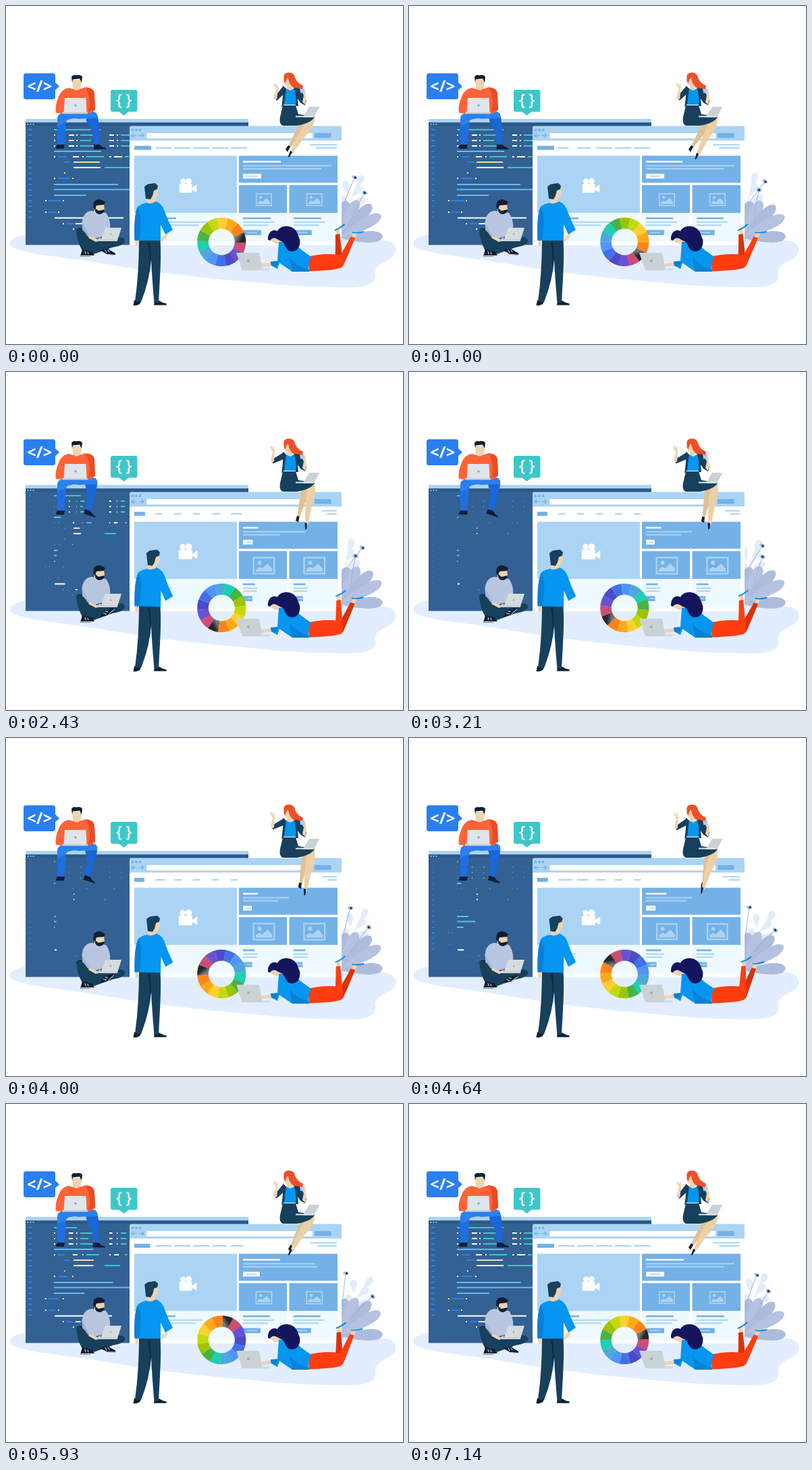
These frames come from a looping animation (588x500 px, 7210 ms). An HTML page:

```html
<!DOCTYPE html>
<html lang="en">
<head>
<meta charset="utf-8">
<title>Web team at work</title>
<style>
html, body { margin: 0; width: 100%; height: 100%; overflow: hidden; background: #fff; }
svg { display: block; width: 588px; height: 500px; }
text { font: 700 24px "Open Sans", "Noto Sans", sans-serif; fill: #fff; text-anchor: middle; }
.navy { fill: #17405c; } .ink { fill: #0e1f33; } .skin { fill: #f0d3b0; }
.blue { fill: #0496f0; } .deep { fill: #0a7fd6; } .sky { fill: #abd4f4; }
.mid { fill: #74b1e7; } .pale { fill: #eefaff; } .white { fill: #fff; }
.orange { fill: #ff6337; } .red { fill: #ff3d10; } .brick { fill: #d93208; }
.grey { fill: #cbd2d6; } .line { fill: none; stroke-linecap: round; stroke-linejoin: round; }
</style>
</head>
<body>
<svg viewBox="0 0 588 500">
<defs>
  <linearGradient id="soot" x1="0" y1="0" x2=".3" y2="1">
    <stop stop-color="#777"/><stop offset="1" stop-color="#272727"/>
  </linearGradient>
  <g id="picture">
    <rect x="-11.2" y="-8.7" width="22.4" height="17.4" fill="none" stroke="#abd4f4" stroke-width="1.7"/>
    <circle cx="-4.7" cy="-3.2" r="2.2" class="sky"/>
    <path class="sky" d="M-9 6.4V4L-5 1.2-2 3 4-2.4 9 3.2V6.4Z"/>
  </g>
</defs>

<path fill="#e2eeff" d="M30 338C10 341 4 349 6 353C10 364 62 369 118 377C165 384 200 391 244 396C290 402 325 405 370 409C420 414 460 416 505 416C540 417 550 407 547 396C546 384 558 380 570 373C581 366 580 352 566 348C540 343 520 347 500 340V320H30Z"/>

<g id="plant">
  <g id="fern" fill="#e2ecfb"></g>
  <g id="leaves"></g>
  <g id="flowerA"><path class="line" d="M498 300Q497 272 498 252" stroke="#9fb4d8"/>
    <ellipse cx="498" cy="250" rx="4" ry="2.6" fill="#aebfe2"/><circle cx="499" cy="250" r="1.7" fill="#20386b"/></g>
  <g id="flowerB"><path class="line" d="M511 317Q509 292 511 273" stroke="#9fb4d8"/>
    <ellipse cx="511" cy="271.5" rx="4.2" ry="2.8" fill="#aebfe2"/><circle cx="511" cy="271.5" r="1.8" fill="#20386b"/></g>
</g>

<path fill="#336193" d="M29 172H359V353.500H29Z"/>
<path class="sky" d="M30 167H358Q359 167 359 168V172.500H29V168Q29 167 30 167Z"/>
<path fill="#2c5887" d="M29 172.500H359V177H29Z"/>
<g class="sky"><circle cx="32.500" cy="175" r="1"/><circle cx="36.500" cy="175" r="1"/><circle cx="40.500" cy="175" r="1"/></g>
<g id="code"></g>

<path class="white" d="M183 198H497V354H183Z"/>
<path class="sky" d="M185 177.500H495Q497 177.500 497 180V199H183V180Q183 177.500 185 177.500Z"/>
<g class="mid"><circle cx="187.500" cy="183.300" r="1.9"/><circle cx="193" cy="183.300" r="1.9"/><circle cx="198.500" cy="183.300" r="1.9"/><path d="M457 188H481.500V195H457Z"/></g>
<path class="line" stroke="#74b1e7" stroke-width="1.2" d="M193 191.700H186.500M189 189L186 191.700L189 194.400M197 191.700H203.500M201 189L204 191.700L201 194.400"/>
<path class="white" d="M208.500 188H454V196H208.500Z"/>
<path class="sky" d="M190 221.500H342V306H190Z"/>
<path class="mid" d="M345 221.500H491V261.500H345ZM345 265H416V306H345ZM419.500 265H491V306H419.500Z"/>
<path class="pale" d="M190 306H342V348.500H190ZM345 306H416V348.500H345ZM419.500 306H491V348.500H419.500Z"/>
<g id="camera" class="white"><circle cx="-6.500" cy="-7" r="4"/><circle cx="2" cy="-7" r="4.600"/><rect x="-12" y="-3" width="19" height="13.500" rx="1.5"/><path d="M7 3L14-2V10L7 6Z"/></g>
<use id="pictureA" href="#picture"/><use id="pictureB" href="#picture"/>
<g id="page"></g>

<g><rect x="26" y="99.500" width="47" height="38.500" rx="3.500" fill="#2a7fef"/><path fill="#2a7fef" d="M72 112L79 119L72 125Z"/><text x="49.700" y="126.500">&lt;/&gt;</text></g>
<g><rect x="155" y="124" width="39.500" height="32.500" rx="3" fill="#3dc7c9"/><path fill="#3dc7c9" d="M167 156H182L174.500 162Z"/><text x="174.700" y="147" style="font-weight:600;font-size:23px">{ }</text></g>

<g>
  <path fill="#1f6fe0" d="M77 162L90 160L86.500 206H76.500Q74 185 77 162Z"/>
  <path class="ink" d="M76 205H87L86 211H74Q74 208 76 205Z"/>
  <g id="sitterLeg"><path fill="#1a66d6" d="M119 160Q134 154 136 164Q139 180 138 206H130.500Q130 186 119 170Z"/>
    <path class="ink" d="M130 205H138Q142 209 148 210.500V212H130Z"/></g>
  <path fill="#2b80f0" d="M76 168Q76 157 90 158L128 156Q137 157 135 166L108 167Q91 165 87 173L76 177Z"/>
  <path class="orange" d="M93 121Q105 126 118 120Q130 121 131 130L132 154L124 159H82L74 158Q72 148 78 134Q82 123 93 121Z"/>
  <path fill="#e94c24" d="M119 121Q131 121 131 131L132 153L122 157Q127 140 119 121Z"/>
  <path class="skin" d="M98 109H112V115Q111 121 109 123Q104 127 99 122Z"/>
  <path class="ink" d="M97 105Q99 101 104 102.500Q111 101 113 105L112 113L109 107.500L99 108.500L98 113Z"/>
  <path fill="#dee6ec" d="M87 136H118.500L119.500 158H85.500Z"/><path class="grey" d="M83 157H121V159.500H83Z"/><circle cx="103" cy="147" r="1.8" fill="#9aa8b5"/>
</g>

<g>
  <g id="legBack"><path fill="#dfc196" d="M438 168L450 167Q446 183 433 194L420 211L417 210Q425 191 438 168Z"/><path class="ink" d="M418 206L421 208L417 216L414 212Z"/></g>
  <g id="legFront"><path fill="#ecd0a7" d="M446 168L458 165Q456 181 441 195L424 219L420.500 218Q429 194 446 168Z"/><path class="ink" d="M421 214L424 216L420 223L417.500 224Z"/></g>
  <path class="navy" d="M410 147H429L433 160L457 164Q453 173 431 177L410 177Q403 174 407 160Z"/>
  <g id="armUpper"><path class="navy" d="M411 118L414 128L401 140L396.500 136Z"/>
    <g id="armLower"><path class="skin" d="M399 139L396.500 135L400 123L396 116L398 114L400 118L402 114L403 121L401.500 137Z"/></g></g>
  <path class="skin" d="M412 104H422L425 121L420 127L415 122L416 118Q412 117 412 112Z"/>
  <path class="blue" d="M412 121L421 125L430 120L431 146H411Z"/>
  <path class="navy" d="M410 118L415 122L412 145L408 150Q411 132 410 118ZM426 119L435 120L445 140L443 147L436 143L432 137L433 148H429Q431 135 426 119Z"/>
  <path class="skin" d="M443 146L445 137L443 123L439 124L441 132L439 142Z"/>
  <path fill="#b3c9ee" d="M435 121.500L442 122L441 128.500H436Z"/>
  <path fill="#ee4f2a" d="M411.500 108Q410 99 418 98.500Q427 98 428 106Q431 114 440 118L439 123Q431 121 426 121Q419 116 418 106Q415 107 414 114Q411 113 411.500 108Z"/>
  <path class="grey" d="M449 149H464.500L456 164.500H440Z"/><path fill="#e4e9ec" d="M429 162.500H455V164.500H429Z"/>
</g>

<g>
  <path class="ink" d="M104 331Q110 325 116 333L148 352L139 362Q111 354 104 331Z"/>
  <path fill="#b9c6df" d="M127 303Q114 304 112.500 321L114 335L128 345L153 338Q157 318 148 306Z"/>
  <path fill="#a5b5d3" d="M114 322L124 341L120 341L113 333Z"/>
  <path class="skin" d="M131 293H145L146 301L141 307L131 306Z"/>
  <path class="ink" d="M130 290Q135 284 142 287L147 290L145 294L134 295L132 301L129 298ZM132 299L137 303L146 301Q145 308 138 308Q131 307 132 299Z"/>
  <path class="navy" d="M104 332Q111 325 121 341Q130 348 148 346L167 342Q177 342 176 349Q174 354 158 357L130 367L113 362Q105 348 104 332Z"/>
  <path class="ink" d="M113 360L127 363L131 369L124 370.500H110Z"/>
  <g id="shoe"><path class="ink" d="M139 361L151 359L162 366V369L151 368Z"/><path class="line" stroke="#fff" stroke-width=".9" d="M151 367.500L162 368.500M147 361L149 365M151 361L153 364"/></g>
  <path class="line" stroke="#fff" stroke-width=".9" d="M111 369.500H130M117 363L118 367M121 364L122 367"/>
  <path class="skin" d="M123 340L136 345L140 342L140 347L133 349L122 343Z"/>
  <path fill="#d5dce0" d="M147 328H171L165 347H140Z"/><path class="grey" d="M133 345H165V348H133Z"/><circle cx="155" cy="337.500" r="1.2" fill="#98a4ae"/>
</g>

<g>
  <path class="ink" d="M190 435L200 437L198 441L193 443H188.500ZM220 436H227Q231 439 237.500 440V442.500H219Z"/>
  <path class="navy" d="M197 345H228.500Q230 370 228 402L226 439H219.500Q216 400 215 374Q213 405 200 438L191 437Q197 395 197 345Z"/>
  <path fill="#0e2d45" d="M213 347L215 374L212 392Q214 368 210 350Z"/>
  <g id="torso"><path class="skin" d="M191 345H196L196 354L192 356ZM209 283L220 281L221 292L209 294Z"/>
    <path id="forearm" class="skin" d="M241 334L237 344L230 349L229 346L233 340Z"/>
    <path class="blue" d="M208 291Q215 294 222 289Q231 292 235 304Q240 318 247 331L236 338L229 323V347H190.500Q189 310 195 297Q199 293 208 291Z"/>
    <path class="deep" d="M195 297L200 312L198 346H190.500Q189 310 195 297Z"/></g>
  <g id="head"><path class="skin" d="M216 267L225 268V280L220 286L213 284Z"/><path class="navy" d="M205 267L210 263.500L221 262L225 266L224 271L219 273L217 281L214 286L207 285Z"/></g>
</g>

<g id="wheel"></g>

<g>
  <path class="grey" d="M341 365H375L380 391H350Z"/><circle cx="359" cy="377" r="2" fill="#a2abb1"/><path fill="#c9def6" d="M378 388H392L390 391.500H379Z"/>
  <g id="legDark"><path class="skin" d="M491 342L490 329L496 327L496 342Z"/><path fill="#0a84dc" d="M488 331Q495 329 503 322L504 324Q497 330 489 332.500Z"/><path class="brick" d="M487 386Q489 360 489.500 338L496 337Q498 360 499 383Z"/></g>
  <path class="red" d="M447 371Q470 365 494 368Q502 378 497 387Q488 391 449 392.500Z"/>
  <g id="legBright"><path class="skin" d="M491 342L490 329L496 327L496 342Z"/><path class="blue" d="M488 331Q495 329 503 322L504 324Q497 330 489 332.500Z"/><path class="red" d="M487 386Q489 360 489.500 338L496 337Q498 360 499 383Z"/></g>
  <path class="skin" d="M390 340L405 337L408 350L401 352Q393 350 390 345Z"/>
  <path class="skin" d="M377 381L397 379L400 384L380 386Z"/>
  <path class="blue" d="M404 349Q423 346 438 361L452 371Q446 382 449 393H424L405 380L402 389L393 384L392 378L402 377Z"/>
  <path class="deep" d="M420 372Q431 386 449 390V393H424ZM392 378H403L401 385L393 384Z"/>
  <path fill="#15155d" d="M388 346C387 334 396 329 402 333C406 324 422 323 429 332C433 338 433 341 435 345C437 354 432 363 424 363C413 363 414 350 408 348C402 346 397 339 391 347Z"/>
</g>
</svg>
<script>
const LOOP = 7210, FRAMES = 101;
const $ = id => document.getElementById(id);
const add = (parent, tag, attrs) => {
  const node = document.createElementNS("http://www.w3.org/2000/svg", tag);
  for (const key in attrs) node.setAttribute(key, attrs[key]);
  return $(parent).appendChild(node);
};
const ease = x => { x = Math.min(1, Math.max(0, x)); return x * x * (3 - 2 * x); };
// 1 is open, 0 is folded; the pause sits between the two eases.
const wave = (t, delay) => {
  const s = (t - delay + 2 * LOOP) % LOOP;
  return 1 - ease(s / 1700) + ease((s - 3200) / 2200);
};

const bars = [];
function bar(parent, x, y, w, h, fill, delay, min, anchor = 0) {
  const node = add(parent, "rect", { x, y: y - h / 2, width: w, height: h, fill });
  bars.push({ node, x, w, delay, min, anchor });
}

// Code window: each run is "x width colour"; runs further right fold later.
const inks = { t: "#3cc5cd", b: "#2d80ec", w: "#fff", l: "#66b9f3", c: "#eddcb0" };
const props = "71 2 w,76 12 b,93 8 w,104 2 w,153 7 w,164 2 w,170 14 t,110 ";
const rows = [
  [183, "71 69 t", 1650],
  [191, props + "28 t", 1050], [199, props + "16 t", 1050], [207, props + "28 t", 1050],
  [215, "71 70 l", 1100],
  [223, "71 2 w,77 12 b,99 9 w,113 2 w,119 26 t,153 3 w,160 12 w,176 6 t", 1100],
  [231, "86 10 b,100 39 c", 1100], [239, "100 40 w,146 38 t", 1150],
  [247, "86 2 c", 1150], [255, "71 2 w,77 17 b,98 2 w", 1100],
  [264, "71 95 l", 900], [271.500, "71 119 l", 800], [280, "71 48 l", 850],
  [288, "58 2 w,63 18 b,84 2 w", 1100], [305, "58 2 w,63 12 b,77 2 w", 1100],
  [313.500, "72 102 w", 1100], [322, "84 2 w,90 11 b,103 10 w", 1100], [330, "99 2 w", 1000]
];
for (const [y, runs, delay] of rows)
  for (const run of runs.split(",")) {
    const [x, w, ink] = run.split(" ");
    bar("code", +x, y, +w, 2, inks[ink], delay + (x - 71) * 4.5, 0.03);
  }
for (let i = 0; i < 17; i++)
  bar("code", 33, 182.800 + i * 8.100, 5.500, 2.200, inks.b, 1300 - i * 82, 0.15, 0.5);

// Page contents
const MID = "#74b1e7", SKY = "#abd4f4", WHITE = "#fff";
bar("page", 190, 209.800, 25, 6, MID, 1050, 0.6);
for (let i = 0; i < 5; i++) bar("page", 221 + 28 * i, 209.800, 24.500, 2.200, SKY, i * 380, 0.42);
bar("page", 450, 205.300, 40, 2, SKY, 850, 0.55, 1);
bar("page", 459, 210, 31, 2, SKY, 900, 0.45, 1);
bar("page", 351, 230.300, 56, 2.600, WHITE, 750, 0.4);
bar("page", 351, 236.300, 131, 2, SKY, 1450, 0.52);
bar("page", 351, 240.800, 116, 2, SKY, 950, 0.45);
bar("page", 351, 251.700, 27, 7, WHITE, 1050, 0.48);
bar("page", 356, 251.700, 16, 1.600, SKY, 1050, 0.45);
bar("page", 195, 314, 57, 2.600, MID, 800, 0.5);
bar("page", 195, 319.700, 103, 2, SKY, 1000, 0.45);
bar("page", 195, 324.300, 90, 2, SKY, 900, 0.45);
for (const x of [351, 425.800]) {
  bar("page", x, 314, 41, 2.600, MID, 800, 0.43);
  bar("page", x, 319.700, 47, 2, SKY, 800, 0.46);
  bar("page", x, 324.300, 38, 2, SKY, 800, 0.55);
  bar("page", x, 335.200, 27, 7.500, MID, 900, 0.5);
  bar("page", x + 6, 335.200, 15, 1.600, SKY, 900, 0.45);
}

// Colour wheel, clockwise from the dark slice
const slices = ["url(#soot)", "#cb4d77", "#6b51d1", "#4b4bc9", "#4470e6", "#4f96fa", "#4da9d8",
  "#1cd0b4", "#48b344", "#9bc503", "#c4d90c", "#ffd030", "#ffa91a", "#ff8318"];
const step = 2 * Math.PI / slices.length;
slices.forEach((stroke, i) => {
  const at = k => { const a = -0.18 + step * (i + k); return `${27.800 * Math.cos(a)} ${27.800 * Math.sin(a)}`; };
  add("wheel", "path", { d: `M${at(-0.5)}A27.800 27.800 0 0 1 ${at(0.51)}`, fill: "none", stroke, "stroke-width": 16.500 });
});

// Plant: leaves fan out from the root.
const leaf = (parent, len, width, fill) => add(parent, "path", {
  d: `M0 0C${-width * 0.5} ${-len * 0.3} ${-width * 1.3} ${-len * 0.95} 0 ${-len}C${width * 1.3} ${-len * 0.95} ${width * 0.5} ${-len * 0.3} 0 0Z`, fill });
const fan = [[10, 56], [25, 62], [43, 69], [60, 71], [88, 65]].map(([angle, len], i) => ({
  angle, node: leaf("leaves", len, 12, i % 2 ? "#b5c2e0" : "#aebcdc") }));
add("fern", "path", { d: "M0 0Q0-35 9-76", fill: "none", stroke: "#d3e0f5" });
[[-22, -4, -50], [-30, -1, -28], [28, 4, -48], [50, 2, -28], [12, 8, -62], [62, 6, -38]].forEach(([angle, x, y]) =>
  leaf("fern", 20, 7, "#e2ecfb").setAttribute("transform", `translate(${x} ${y}) rotate(${angle})`));

// id, angle when folded, pivot, delay
const joints = [
  ["sitterLeg", 18, 130, 162, 900], ["legBack", -22, 446, 168, 1200], ["legFront", -24, 453, 168, 450],
  ["armUpper", 20, 411, 122, 800], ["armLower", -22, 399, 137, 800],
  ["torso", 1.2, 213, 347, 900], ["shoe", -48, 141, 362, 900]
];
const turn = (id, angle, x, y) => $(id).setAttribute("transform", `rotate(${angle} ${x} ${y})`);
const place = (id, x, y, scale) => $(id).setAttribute("transform", `translate(${x} ${y}) scale(${scale})`);

function pose(t) {
  for (const b of bars) {
    const w = b.w * (b.min + (1 - b.min) * wave(t, b.delay));
    b.node.setAttribute("width", w);
    b.node.setAttribute("x", b.x + (b.w - w) * b.anchor);
  }
  for (const [id, angle, x, y, delay] of joints) turn(id, angle * (1 - wave(t, delay)), x, y);
  const fold = 1 - wave(t, 900);
  turn("legBright", 27 - 28 * fold, 494, 384);
  turn("legDark", -2 + 29 * fold, 494, 384);
  place("head", 3 * fold, 0.8 * fold, 1);
  $("forearm").setAttribute("opacity", 1 - fold);
  place("camera", 268.500, 266, 0.98 + 0.08 * fold);
  place("pictureA", 382, 286.500, 1 + 0.37 * fold);
  place("pictureB", 456.800, 286.500, 1 + 0.37 * fold);
  $("wheel").setAttribute("transform", `translate(319.300 349) rotate(${360 * t / LOOP})`);

  const sway = ease(0.5 + 0.5 * Math.cos(2 * Math.PI * (t - 1800) / LOOP));
  turn("flowerA", 6 + 31 * sway, 498, 300);
  turn("flowerB", 45 - 37 * sway, 511, 317);
  $("fern").setAttribute("transform", `translate(500 328) rotate(${22 - 22 * sway})`);
  fan.forEach(({ angle, node }, i) =>
    node.setAttribute("transform", `translate(493 343) rotate(${angle + (i < 4 ? 3 * sway : 0)})`));
}

const start = performance.now();
function tick() {
  const elapsed = (performance.now() - start) % LOOP;
  pose(Math.floor(elapsed * FRAMES / LOOP) * LOOP / FRAMES);
  requestAnimationFrame(tick);
}
tick();
</script>
</body>
</html>
```
